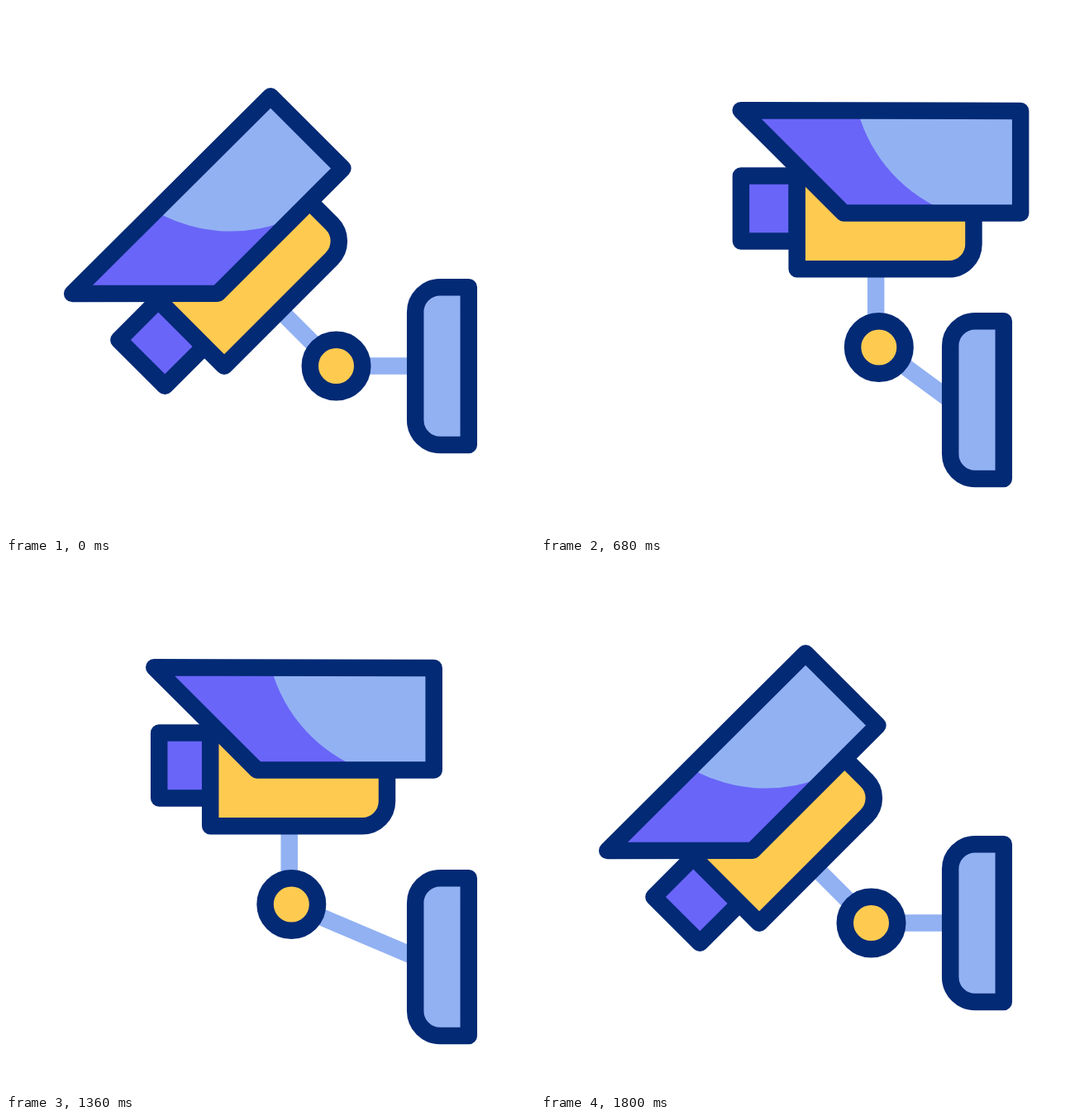
Animation of 640x640 px, one loop 2 s. Source, as an HTML page:

```html
<!DOCTYPE html>
<html lang="en">
<head>
<meta charset="utf-8">
<title>Security camera</title>
<style>
  html, body { margin: 0; height: 100%; overflow: hidden; background: #fff; }
  svg { display: block; width: 100%; height: 100%; }
  .outline { stroke: #032a75; stroke-width: 20.5; stroke-linejoin: round; fill: none; }
  .arm { stroke: #92b1f3; stroke-width: 20.5; }
  .light { fill: #92b1f3; }
  .purple { fill: #6965f8; }
  .yellow { fill: #fecb50; }
</style>
</head>
<body>
<svg viewBox="0 0 640 640">
  <line id="wallArm" class="arm" x2="495"/>
  <g id="camera">
    <path class="arm" d="M350 318V413"/>
    <rect id="lens" class="outline purple" x="186.7" y="205.5" width="68" height="79"/>
    <path class="outline yellow" d="M254.5 195V318.3H438.3a30 30 0 0 0 30-30V195Z"/>
    <path class="purple" d="M186.5 126.2L525 127V250.5H311Z"/>
    <path class="light" d="M328 127A183.5 183.5 0 0 0 441 250.5H525V127Z"/>
    <path class="outline" d="M186.5 126.2L525 127V250.5H311Z"/>
  </g>
  <circle id="joint" class="outline yellow" r="31.75"/>
  <path id="wall" class="outline light" d="M559.8 340.2H525.2a30 30 0 0 0-30 30V501a30 30 0 0 0 30 30H559.8Z"/>
</svg>
<script>
  const LOOP = 2000;
  const [wallArm, camera, lens, joint, wall] =
    ['wallArm', 'camera', 'lens', 'joint', 'wall'].map(id => document.getElementById(id));

  // Smooth 0..1 progress between two times
  function ease(t, start, end) {
    const x = Math.min(1, Math.max(0, (t - start) / (end - start)));
    return x * x * (3 - 2 * x);
  }

  function draw(t) {
    const raise = ease(t, 120, 480);
    const tilt = ease(t, 1400, 1760);
    const settle = ease(t, 1440, 1760);
    const lift = raise - settle;

    const pivotX = 380.9 + 31.9 * raise - 70.1 * ease(t, 640, 840) + 38.2 * settle;
    const pivotY = 417.5 - 29.5 * lift;
    const angle = -45 * (1 - raise + tilt);
    camera.setAttribute('transform',
      `translate(${pivotX} ${pivotY}) rotate(${angle}) translate(-350 -388)`);

    const zoom = ease(t, 800, 1120) - ease(t, 1120, 1440);
    lens.setAttribute('transform', `translate(${38 * zoom})`);

    const jointX = 399.5 + 17.4 * raise - 71.6 * ease(t, 640, 836) + 54.2 * tilt;
    const jointY = 435.5 - 22.5 * (raise - tilt) + 15 * tilt * (1 - tilt);
    joint.setAttribute('cx', jointX);
    joint.setAttribute('cy', jointY);

    const drop = 41 * lift;
    wall.setAttribute('transform', `translate(0 ${drop})`);
    wallArm.setAttribute('x1', jointX);
    wallArm.setAttribute('y1', jointY);
    wallArm.setAttribute('y2', 435.5 + drop);
  }

  const begin = performance.now();
  function tick() {
    draw((performance.now() - begin) % LOOP);
    requestAnimationFrame(tick);
  }
  tick();
</script>
</body>
</html>
```
